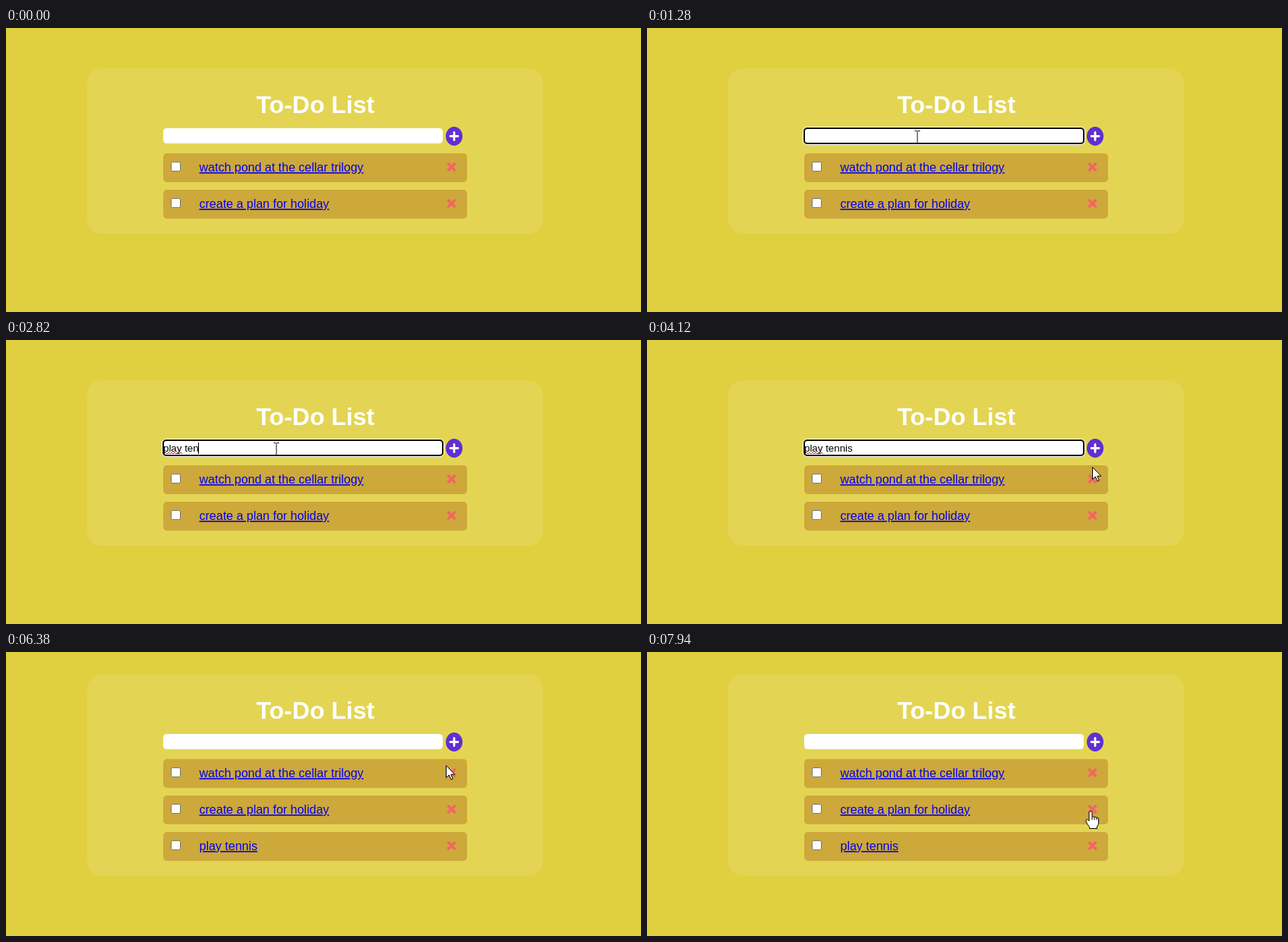
An HTML page for the animation above (8000 ms loop, 836 px wide and 374 px high).

```html
<!DOCTYPE html>
<html lang="en">
<head>
<meta charset="utf-8">
<title>To-Do List</title>
<style>
  html, body { margin: 0; width: 100%; height: 100%; overflow: hidden; background: #e0d03f; }
  svg { display: block; font: 16px "Liberation Sans", Arial, sans-serif; }
  h1, .title { font-size: 32px; font-weight: bold; fill: #fff; text-anchor: middle; }
  .link { fill: #00e; text-decoration: underline; }
  .typed { font-size: 13.333px; white-space: pre; }
  .cross { stroke: #f46464; stroke-width: 3.4; stroke-linecap: round; }
  .ring { fill: none; }
  .ring .outer { stroke: #fff; }
  .ring .inner { stroke: #101010; stroke-width: 2; }
  .cursor { fill: #fff; stroke: #000; stroke-linejoin: round; }
</style>
</head>
<body>
<svg width="836" height="374" viewBox="0 0 836 374">
  <g id="page">
    <rect id="panel" x="107" y="53" width="600" height="218" rx="20" fill="#fff" fill-opacity=".1"/>
    <text class="title" x="407.3" y="112">To-Do List</text>
    <rect x="207" y="132" width="368" height="20" rx="4.5" fill="#fff"/>
    <text id="typed" class="typed" x="207" y="147"></text>
    <path id="squiggle" fill="none" stroke="#e02020"/>
    <rect id="caret" y="135" width="1" height="15"/>
    <g id="inputRing" class="ring">
      <rect class="outer" x="205.5" y="130.5" width="371" height="23" rx="5.5"/>
      <rect class="inner" x="207" y="132" width="368" height="20" rx="4"/>
    </g>
    <ellipse cx="590" cy="142.5" rx="11" ry="12.5" fill="#6030d0"/>
    <path d="M585 142.5h10M590 137.5v10" stroke="#fff" stroke-width="2.8" stroke-linecap="round"/>
    <g id="buttonRing" class="ring">
      <rect class="outer" x="577.5" y="128.5" width="25" height="28" rx="4.5"/>
      <rect class="inner" x="579" y="130" width="22" height="25" rx="3"/>
    </g>
    <g id="items"></g>
  </g>
  <circle id="click" cy="143" r="12" fill="#ff0" fill-opacity=".5"/>
  <g id="pointer">
    <path id="arrow" class="cursor" d="M.5.5V16.5L4.3 13 7 19 9.3 18 6.7 12.2H11.8Z"/>
    <g id="hand" class="cursor">
      <path d="M-2 2Q-2 .5 0 .5T2 2V8Q4 7 5 8.5Q7 7.6 8 9.2Q10.5 8.6 10.5 11V16Q10.5 19 8.5 21V23.5H-1.5V21.5Q-5 17-6 14Q-6.5 11.5-4.5 11.5Q-3 12-2 13.5Z"/>
      <path d="M2 8v4M5 8.5v3.5M8 9.2v3" fill="none"/>
    </g>
    <path id="beam" d="M-3.5-7.5h3M.5-7.5h3M0-7V8M-3.5 8.5h3M.5 8.5h3" fill="none" stroke="#111"/>
  </g>
</svg>
<script>
const $ = id => document.getElementById(id);
const LOOP = 8000, STEP = 65;
const FOCUS = 1190, SUBMIT = 4890, ADDED = 6020;
const TEXT = "play tennis";
const KEYS_AT = [1380, 1690, 1810, 2060, 2310, 2430, 2560, 2820, 3000, 3180, 3360];

// Pointer waypoints: time, x, y
const PATH = [
  [160, 518, 72], [420, 455, 138], [615, 395, 159], [810, 344, 147], [940, 357, 144],
  [1010, 356, 143], [3795, 356, 143], [4120, 586, 167], [4380, 600, 178], [4640, 594, 143],
  [6315, 594, 143], [6770, 488, 185], [7160, 518, 241], [7940, 584, 209]
];

const item = (label, i) => `<g transform="translate(0 ${48 * i})">
  <rect x="207" y="165" width="400" height="38" rx="5" fill="#cda83b"/>
  <rect x="217.5" y="176.5" width="12" height="12" rx="2" fill="#fff" stroke="#767676"/>
  <text class="link" x="254.5" y="189">${label}</text>
  <path class="cross" d="M582.5 179l8 8m0-8l-8 8"/></g>`;
$("items").innerHTML = ["watch pond at the cellar trilogy", "create a plan for holiday", TEXT].map(item).join("");
const newItem = $("items").lastElementChild;

$("squiggle").setAttribute("d", "M208 150" + "l2-2l2 2".repeat(6));

const show = (el, on) => el.style.display = on ? "" : "none";
const during = (t, from, to) => t >= from && t < to;

function pointerAt(t) {
  const next = PATH.findIndex(p => p[0] > t);
  if (next < 1) return PATH[PATH.length - 1].slice(1);
  const [t0, x0, y0] = PATH[next - 1], [t1, x1, y1] = PATH[next];
  const k = Math.floor((t - t0) / STEP) * STEP / (t1 - t0);
  return [Math.round(x0 + (x1 - x0) * k), Math.round(y0 + (y1 - y0) * k)];
}

function shapeAt(x, y, rows) {
  const inside = (l, t, r, b) => x >= l && x <= r && y >= t && y <= b;
  if (inside(207, 132, 575, 152)) return "beam";
  if (inside(579, 130, 601, 155)) return "hand";
  for (let i = 0; i < rows; i++)
    if (inside(580, 177 + 48 * i, 593, 190 + 48 * i)) return "hand";
  return "arrow";
}

function draw(now) {
  const t = now % LOOP, added = t >= ADDED, shift = added ? -24 : 0;
  $("page").setAttribute("transform", `translate(0 ${shift})`);
  $("panel").setAttribute("height", added ? 266 : 218);
  show(newItem, added);

  const count = KEYS_AT.filter(k => k <= t).length;
  const typed = $("typed");
  typed.textContent = added ? "" : TEXT.slice(0, count);
  const focused = during(t, FOCUS, SUBMIT);
  show($("inputRing"), focused);
  show($("buttonRing"), during(t, SUBMIT, ADDED));
  show($("squiggle"), during(t, KEYS_AT[4], SUBMIT));
  show($("caret"), focused && t >= 1280 && !during(t, 3860, 4360));
  $("caret").setAttribute("x", 207 + Math.floor(count && typed.getComputedTextLength()));

  show($("click"), during(t, FOCUS, 1280) || during(t, SUBMIT, 5090));
  $("click").setAttribute("cx", t < SUBMIT ? 354 : 594);

  show($("pointer"), t >= PATH[0][0]);
  const [x, y] = pointerAt(t);
  const shape = shapeAt(x, y - shift, added ? 3 : 2);
  for (const id of ["arrow", "hand", "beam"]) show($(id), id === shape);
  $("pointer").setAttribute("transform", `translate(${x} ${y})`);
}

const start = performance.now();
function frame() {
  draw(performance.now() - start);
  requestAnimationFrame(frame);
}
frame();
</script>
</body>
</html>
```
